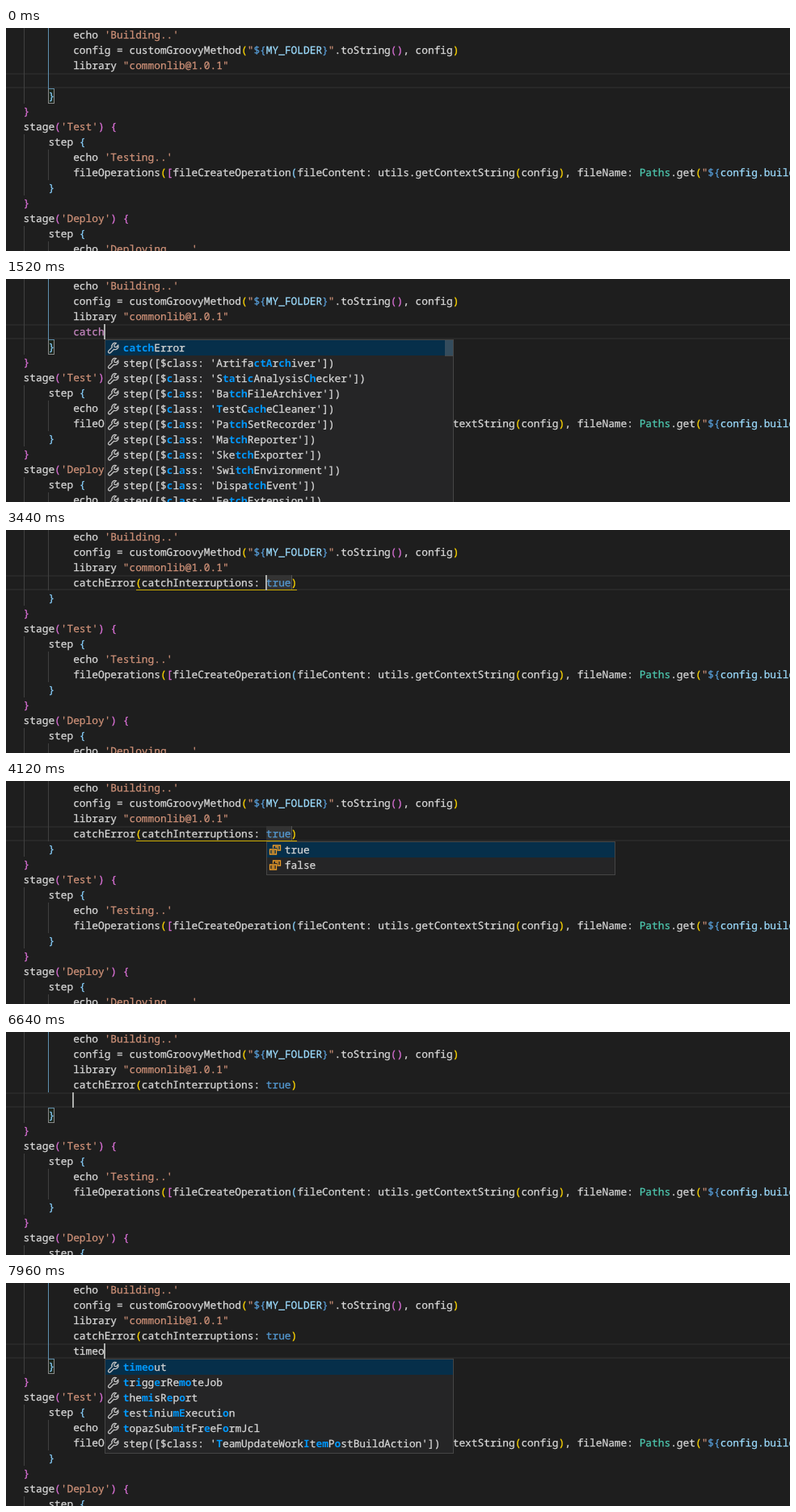
These frames come from a looping animation (970 by 277 pixels, 8 s). An HTML page:

```html
<!DOCTYPE html>
<html lang="en">
<head>
<meta charset="utf-8">
<title>Pipeline editor</title>
<style>
  html, body { margin: 0; width: 100%; height: 100%; overflow: hidden; background: #1e1e1e; }
  svg { display: block; width: 970px; height: 277px; }
  text { font: 12.83px "Noto Sans Mono", "DejaVu Sans Mono", monospace; color: #d8d8d8; white-space: pre; text-rendering: geometricPrecision; }
  text, tspan { fill: currentColor; stroke: currentColor; stroke-width: .25; }
  text.prose { font: 13.22px "Open Sans", "Noto Sans", sans-serif; }
  rect { shape-rendering: crispEdges; }
  .str { color: #ce9178; }
  .key { color: #569cd6; }
  .var { color: #9cdcfe; }
  .type { color: #4ec9b0; }
  .flow { color: #c586c0; }
  .b1 { color: #ffd700; }
  .b2 { color: #da70d6; }
  .b3 { color: #87cefa; }
  .dim { color: #a8a8a8; }
  .hit { color: #0097fb; font-weight: 700; stroke: none; }
  .icon { fill: none; stroke: #c5c5c5; stroke-width: 1.3; }
  .enum { stroke: #ee9d28; }
</style>
</head>
<body>
<svg id="stage" viewBox="0 0 970 277"></svg>
<script>
const LOOP = 8000, ROW = 19, CHAR = 7.697, LEFT = 21.2, POPUP_W = 432;
const colX = col => LEFT + col * CHAR;
const rowY = row => row * ROW - 1;

// Code: [indent column, ...parts], a part being plain text or [class, text].
const s = t => ['str', t], y = t => ['b1', t], p = t => ['b2', t], b = t => ['b3', t];
const stageLine = name => [0, 'stage', p('('), s(`'${name}'`), p(')'), ' ', p('{')];
const head = [
  [8, 'echo ', s("'Building..'")],
  [8, 'config = customGroovyMethod', y('('), s('"'), ['key', '${'], ['var', 'MY_FOLDER'], ['key', '}'], s('"'),
    '.toString', p('()'), ', config', y(')')],
  [8, 'library ', s('"commonlib@1.0.1"')]
];
const tail = [
  [4, b('}')],
  [0, p('}')],
  stageLine('Test'),
  [4, 'step ', b('{')],
  [8, 'echo ', s("'Testing..'")],
  [8, 'fileOperations', y('('), p('['), 'fileCreateOperation', b('('), 'fileContent: utils.getContextString', y('('),
    'config', y(')'), ', fileName: ', ['type', 'Paths'], '.get', y('('), s('"'), ['key', '${'], ['var', 'config.buildDir']],
  [4, b('}')],
  [0, p('}')],
  stageLine('Deploy'),
  [4, 'step ', b('{')],
  [8, 'echo ', s("'Deploying....'")]
];

// Completion lists
const step = name => `step([$class: '${name}'])`;
const C_STEPS = ['catchError', 'castecho', 'chlAtuoAction', 'cachetgatingmetrics', 'carbonetes', 'chatterPost',
  'createBarrier', 'createCloudifyEnv', 'createCondition', 'createDeployment', 'createDeploymentEvent'];
const CATCH_STEPS = ['catchError', ...['ArtifactArchiver', 'StaticAnalysisChecker', 'BatchFileArchiver',
  'TestCacheCleaner', 'PatchSetRecorder', 'MatchReporter', 'SketchExporter', 'SwitchEnvironment',
  'DispatchEvent', 'FetchExtension'].map(step)];
const TIMEO_STEPS = ['timeout', 'triggerRemoteJob', 'themisReport', 'testiniumExecution', 'topazSubmitFreeFormJcl',
  step('TeamUpdateWorkItemPostBuildAction')];
const T_STEPS = ['timeout', 'timestamps', 'tool', 'tm', 'touchFile', 'testReport', ...TIMEO_STEPS.slice(1)];
const ARGS = ['buildResult', 'catchInterruptions', 'message', 'stageResult'];
const BOOLS = ['true', 'false'];

const DOC = ['If true, certain types of exceptions that are used to',
  'interrupt the flow of execution for Pipelines will be',
  'caught and handled by the step. If false, those',
  'types of exceptions will be caught and immediately',
  'rethrown. Examples of these types of exceptions',
  'include those thrown when a build is manually',
  'aborted through the UI and those thrown by the'];

// Each step changes part of the state and keeps the rest.
const typed = (text, more) => ({ text, query: text, col: 8 + text.length, on: true, ...more });
const off = { on: false }, on = { on: true };
const steps = [
  [0, { text: '', done: '', query: '', col: 8, on: false, list: null, sel: 0, doc: '', guide: 1, box: 'scope', under: false, pick: false, plain: false }],
  [440, on],
  [640, typed('c')],
  [760, { list: C_STEPS }],
  [960, typed('ca')],
  [1200, typed('cat')],
  [1400, typed('catc', { list: CATCH_STEPS })],
  [1520, typed('catch')],
  [1720, typed('catchE')],
  [2040, { text: 'catchError()', query: '', col: 19, list: ARGS, sel: 1, doc: 'arg', box: 'parens', plain: true }],
  [2280, { guide: 0, under: true, plain: false }],
  [2480, off],
  [3040, on],
  [3440, { text: 'catchError(catchInterruptions: true)', col: 39, list: null, doc: '', box: '', pick: true }],
  [3560, { list: BOOLS, sel: 0 }],
  [4120, off],
  [4440, on],
  [4560, { sel: 1 }],
  [5120, { sel: 0, on: false }],
  [5320, { list: null, col: 43, on: true, pick: false, box: 'parens' }],
  [5880, off],
  [6200, { col: 44, on: true, under: false, guide: 1 }],
  [6640, { done: 'catchError(catchInterruptions: true)', text: '', col: 8, box: 'scope' }],
  [6840, { guide: 2 }],
  [7080, off],
  [7400, typed('t')],
  [7520, { list: T_STEPS, doc: 'loading' }],
  [7640, typed('ti', { doc: '' })],
  [7720, typed('tim')],
  [7840, typed('time')],
  [7960, typed('timeo', { list: TIMEO_STEPS })]
];
const states = [];
for (const [, change] of steps) states.push({ ...states.at(-1), ...change });

const esc = t => t.replace(/&/g, '&amp;').replace(/</g, '&lt;');
const span = part => typeof part === 'string' ? esc(part) : `<tspan class="${part[0]}">${esc(part[1])}</tspan>`;
const text = (x, base, parts, cls = '') => `<text x="${x}" y="${base}" class="${cls}">${parts.map(span).join('')}</text>`;
const rect = (x, top, w, h, fill) => `<rect x="${x}" y="${top}" width="${w}" height="${h}" fill="${fill}"/>`;
const frame = (x, top, w, h, fill, line) => rect(x, top, w, h, line) + rect(x + 1, top + 1, w - 2, h - 2, fill);
const codeLine = ([col, ...parts], row) => text(colX(col) + .4, rowY(row) + 14, parts);
const bracketBox = (col, row) => frame(Math.round(colX(col)), rowY(row), 8, ROW, '#1c251c', '#888');

function colour(line, plain) {
  return line.split(/([()]|\btrue\b|^catch$)/).filter(Boolean).map(t =>
    /[()]/.test(t) && !plain ? y(t) : t === 'true' ? ['key', t] : t === 'catch' ? ['flow', t] : t);
}

// Subsequence match with the most touching letters; neighbouring query letters may be swapped.
function findHits(word, query) {
  const low = word.toLowerCase(), q = query.toLowerCase();
  const forms = [q];
  for (let i = 1; i < q.length - 1; i++) forms.push(q.slice(0, i) + q[i + 1] + q[i] + q.slice(i + 2));
  for (const from of [low.indexOf("'") + 1, 0]) {
    let best = [], most = -1;
    for (const form of forms) {
      const hits = [];
      let at = from;
      for (const ch of form) {
        at = low.indexOf(ch, at);
        if (at < 0) break;
        hits.push(at++);
      }
      const touching = hits.filter((h, i) => i && h === hits[i - 1] + 1).length;
      if (hits.length === q.length && touching > most) [best, most] = [hits, touching];
    }
    if (most >= 0) return best;
  }
  return [];
}

const wrench = '<path class="icon" d="M11.2 2.2a4 4 0 0 0-5 5.2L2 11.6a1.6 1.6 0 0 0 2.4 2.4l4.2-4.2a4 4 0 0 0 5.2-5l-2.4 2.4-2.2-.4-.4-2.2z"/>';
const enumIcon = '<path class="icon enum" d="M5.5 6V2.5h9v6h-4M1.5 7.5h8v6h-8zM3.5 9.5h4M3.5 11.5h4M8 4.5h4.5M10.5 6.5h2"/>';

function popup(st, top) {
  const left = Math.ceil(colX(st.col));
  const icon = st.list === BOOLS ? enumIcon : wrench;
  let out = frame(left, top, POPUP_W, st.list.length * ROW + 4, '#252526', '#454545');
  st.list.forEach((word, i) => {
    const rowTop = top + 1 + i * ROW;
    if (i === st.sel) out += rect(left + 1, rowTop, POPUP_W - 2, ROW, '#062f4a');
    const hits = findHits(word, st.query);
    const parts = [...word].map((ch, k) => hits.includes(k) ? ['hit', ch] : ch);
    out += `<g transform="translate(${left + 3} ${rowTop + 1.5})">${icon}</g>`;
    out += text(left + 22.8, rowTop + 14, parts);
  });
  if (st.list.length > 8) out += rect(left + 421, top + 1, 10, 20, 'rgba(121,121,121,.4)');
  if (st.doc) out += details(st.doc, left + POPUP_W - 1, top);
  return out;
}

function details(kind, left, top) {
  if (kind === 'loading') return frame(left, top, 332, 28, '#252526', '#454545') + text(left + 6, top + 19, [['dim', 'Loading...']]);
  const last = top + 55 + DOC.length * ROW;
  return frame(left, top, 332, 198, '#252526', '#454545') +
    text(left + 5.9, top + 19, [['dim', 'boolean (Optional)']]) +
    `<path d="M${left + 315.5} ${top + 10.5}l8 8m0-8l-8 8" stroke="#d4d4d4" stroke-width="1.2"/>` +
    DOC.map((line, i) => text(left + 6, top + 55 + i * ROW, [line], 'prose')).join('') +
    rect(left + 6, last - 13, 62, 18, '#1a1a1b') +
    text(left + 9.9, last, ['timeout']) + text(left + 74, last, ['step.'], 'prose');
}

function guides(st, shift) {
  const bar = (x, from, to, fill = '#404040') => rect(x, rowY(from), 1, (to - from) * ROW, fill);
  const active = st.guide ? '#5f90ae' : '#404040';
  return bar(22, 0, 5 + shift) + bar(22, 7 + shift, 11 + shift) + bar(22, 13 + shift, 16) +
    bar(52, 0, st.guide === 2 ? 5 : 4, active) +
    (st.guide ? rect(52, rowY(4 + shift), 8, 1, active) : '') +
    bar(52, 8 + shift, 10 + shift) + bar(52, 14 + shift, 16);
}

function draw(st) {
  const shift = st.done ? 1 : 0, row = 3 + shift, top = rowY(row);
  let out = rect(0, top, 970, 2, '#282828') + rect(0, top + ROW - 2, 970, 2, '#282828');
  if (st.box === 'scope') out += bracketBox(4, row + 1);
  if (st.box === 'parens') out += bracketBox(18, row) + bracketBox(7 + st.text.length, row);
  out += guides(st, shift);
  if (st.pick) out += rect(322, top, 31, ROW, '#333') + rect(353, top, 1, ROW, '#525252');
  out += head.map(codeLine).join('');
  if (st.done) out += codeLine([8, ...colour(st.done)], 3);
  out += codeLine([8, ...colour(st.text, st.plain)], row);
  out += tail.map((line, i) => codeLine(line, i + row + 1)).join('');
  if (st.under) out += rect(161, top + ROW - 1, Math.round(st.text.length * CHAR) - 78, 1, '#c9aa00');
  if (st.list) out += popup(st, top + ROW);
  if (st.on) out += rect(Math.floor(colX(st.col)), top, 2, ROW, '#aeafad');
  return out;
}

const stage = document.getElementById('stage');
const start = performance.now();
let shown = -1;
function tick() {
  const t = (performance.now() - start) % LOOP;
  const now = steps.findLastIndex(([at]) => at <= t);
  if (now !== shown) stage.innerHTML = draw(states[shown = now]);
  requestAnimationFrame(tick);
}
tick();
</script>
</body>
</html>
```
